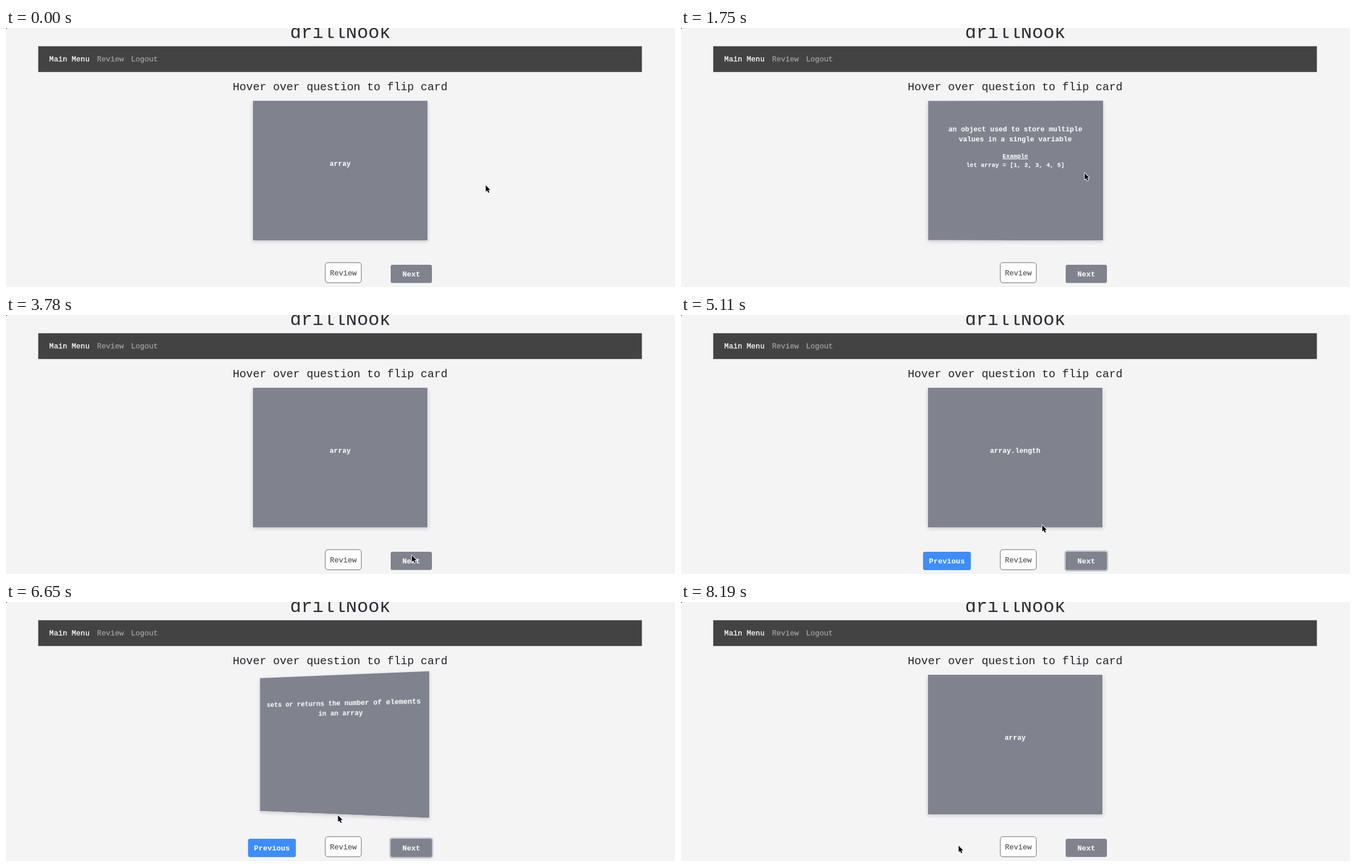
Write an HTML page that moves like this. It is 1200 by 466 pixels and loops after 8540 ms.

```html
<!DOCTYPE html>
<html lang="en">
<head>
<meta charset="utf-8">
<title>Flash cards</title>
<style>
  html, body { margin: 0; width: 100%; height: 100%; overflow: hidden; background: #f4f4f4; }
  #stage { position: absolute; left: 0; top: 0; width: 1200px; height: 466px; overflow: hidden; }
  svg { position: absolute; left: 0; top: 0; overflow: visible; }
  text { font-family: "Liberation Mono", "Courier New", monospace; font-size: 13.4px; white-space: pre; }
  .mid { text-anchor: middle; }
  .bold { font-weight: bold; fill: #fff; }
  .white { fill: #fff; stroke: #fff; }
  .grey { fill: #a0a0a0; stroke: #a0a0a0; }
  .dark { fill: #5c5d61; stroke: #5c5d61; }
  .white, .grey, .dark { stroke-width: .3px; }
  #scene { position: absolute; left: 442.5px; top: 131px; width: 313.5px; height: 250.5px; perspective: 836px; }
  #card, .face { position: absolute; width: 100%; height: 100%; }
  #card { transform-style: preserve-3d; box-shadow: 0 3.3px 6.7px rgba(40, 20, 70, .2); }
  .face { background: #80838e; backface-visibility: hidden; }
  .face text { fill: #fff; font-size: 12.54px; font-weight: bold; text-anchor: middle; }
  .face .small { font-size: 10.9px; }
  #back { transform: rotateY(180deg); }
</style>
</head>
<body>
<div id="stage">
  <svg width="1200" height="466">
    <path d="M0 0H2.5Q.6 .6 0 2.5Z" fill="#444"/>
    <text class="mid" x="599.6" y="18" fill="#2b2932" style="font-size:33.4px">drillNook</text>
    <rect x="57.8" y="32.8" width="1082.8" height="46.4" fill="#434343"/>
    <text class="white" x="77.6" y="60">Main Menu</text>
    <text class="grey" x="163.2" y="60">Review</text>
    <text class="grey" x="224.3" y="60">Logout</text>
    <text class="mid" x="599.4" y="112" fill="#212226" style="font-size:20.07px">Hover over question to flip card</text>
    <rect x="572.7" y="422.2" width="64.6" height="36.2" rx="4.5" fill="#fff" stroke="#66676c"/>
    <text class="mid dark" x="605" y="444.5">Review</text>
    <rect id="ring" x="687.4" y="423.4" width="79" height="38" rx="5.5" fill="#c3c8cf"/>
    <rect x="690" y="426" width="74" height="32.8" rx="3.4" fill="#80838e"/>
    <text class="mid bold" x="727" y="447">Next</text>
    <g id="previous">
      <rect x="434.2" y="425.9" width="85.7" height="33" rx="3.4" fill="#3d8dfd"/>
      <text class="mid bold" x="477" y="447">Previous</text>
    </g>
  </svg>
  <div id="scene">
    <div id="card">
      <div class="face">
        <svg width="313" height="250"><text id="term" x="156.4" y="116.5"></text></svg>
      </div>
      <div class="face" id="back">
        <svg width="313" height="250">
          <text id="line1" x="156.7" y="55"></text>
          <text id="line2" x="156.7" y="73"></text>
          <g id="example">
            <text class="small" x="156.7" y="103" text-decoration="underline">Example</text>
            <text class="small" x="156.7" y="119">let array = [1, 2, 3, 4, 5]</text>
          </g>
        </svg>
      </div>
    </div>
  </div>
  <svg width="1200" height="466">
    <path id="cursor" d="M0 0V11.6L2.6 9.3L4.5 13.6L6.5 12.7L4.6 8.5H8.2Z"
      fill="#000" stroke="#fff" stroke-width="1.9" paint-order="stroke" stroke-linejoin="round"/>
  </svg>
</div>
<script>
const LOOP = 8540, STEP = 70, FLIP = 600, FADE = 150;
const NEXT_CLICK = 3990, PREV_PRESS = 7910, PREV_CLICK = 7980;
const CARDS = [
  ["array", "an object used to store multiple", "values in a single variable"],
  ["array.length", "sets or returns the number of elements", "in an array"]
];
// when the pointer is over the card
const hovers = [{ enter: 1195, leave: 2552 }, { enter: 5162, leave: 6594 }];
const home = [860.5, 283];
const moves = [
  { from: 560, to: 1470, at: [724, 261] },
  { from: 2380, to: 2870, at: [817, 268.5] },
  { from: 2950, to: 3900, at: [724, 440] },
  { from: 4270, to: 5110, at: [648, 378] },
  { from: 5110, to: 5600, at: [635.5, 346.5] },
  { from: 6350, to: 6930, at: [559.5, 417.5] },
  { from: 6930, to: 7630, at: [498, 438.5] }
];
const $ = id => document.getElementById(id);
const clamp = v => Math.min(1, Math.max(0, v));
const smooth = v => v * v * (3 - 2 * v);

// The CSS "ease" curve, cubic-bezier(.25, .1, .25, 1)
function ease(x) {
  if (x <= 0 || x >= 1) return clamp(x);
  const curve = (u, a, b) => 3 * u * (1 - u) ** 2 * a + 3 * u * u * (1 - u) * b + u ** 3;
  let lo = 0, hi = 1;
  for (let i = 0; i < 24; i++) {
    const mid = (lo + hi) / 2;
    if (curve(mid, .25, .25) < x) lo = mid; else hi = mid;
  }
  return curve(lo, .1, 1);
}

function pointer(t) {
  return moves.reduce((pos, { from, to, at }) => {
    const k = smooth(clamp((t - from) / (to - from)));
    return pos.map((v, i) => v + (at[i] - v) * k);
  }, home);
}

function angle(t) {
  return 180 * hovers.reduce((sum, { enter, leave }) =>
    sum + ease((t - enter) / FLIP) - ease((t - leave) / FLIP), 0);
}

function draw(t) {
  const second = t >= NEXT_CLICK && t < PREV_CLICK;
  const words = CARDS[second ? 1 : 0];
  ["term", "line1", "line2"].forEach((id, i) => { $(id).textContent = words[i]; });
  $("example").style.display = second ? "none" : "";
  $("previous").style.display = second ? "" : "none";
  $("ring").style.opacity = ease((t - NEXT_CLICK + STEP) / FADE) - ease((t - PREV_PRESS) / FADE);
  $("card").style.transform = `rotateY(${angle(t)}deg)`;
  $("cursor").setAttribute("transform", `translate(${pointer(t)})`);
}

const start = performance.now();
function tick(now) {
  const t = Math.max(0, now - start) % LOOP;
  draw(Math.floor(t / STEP) * STEP);
  requestAnimationFrame(tick);
}
draw(0);
requestAnimationFrame(tick);
</script>
</body>
</html>
```
